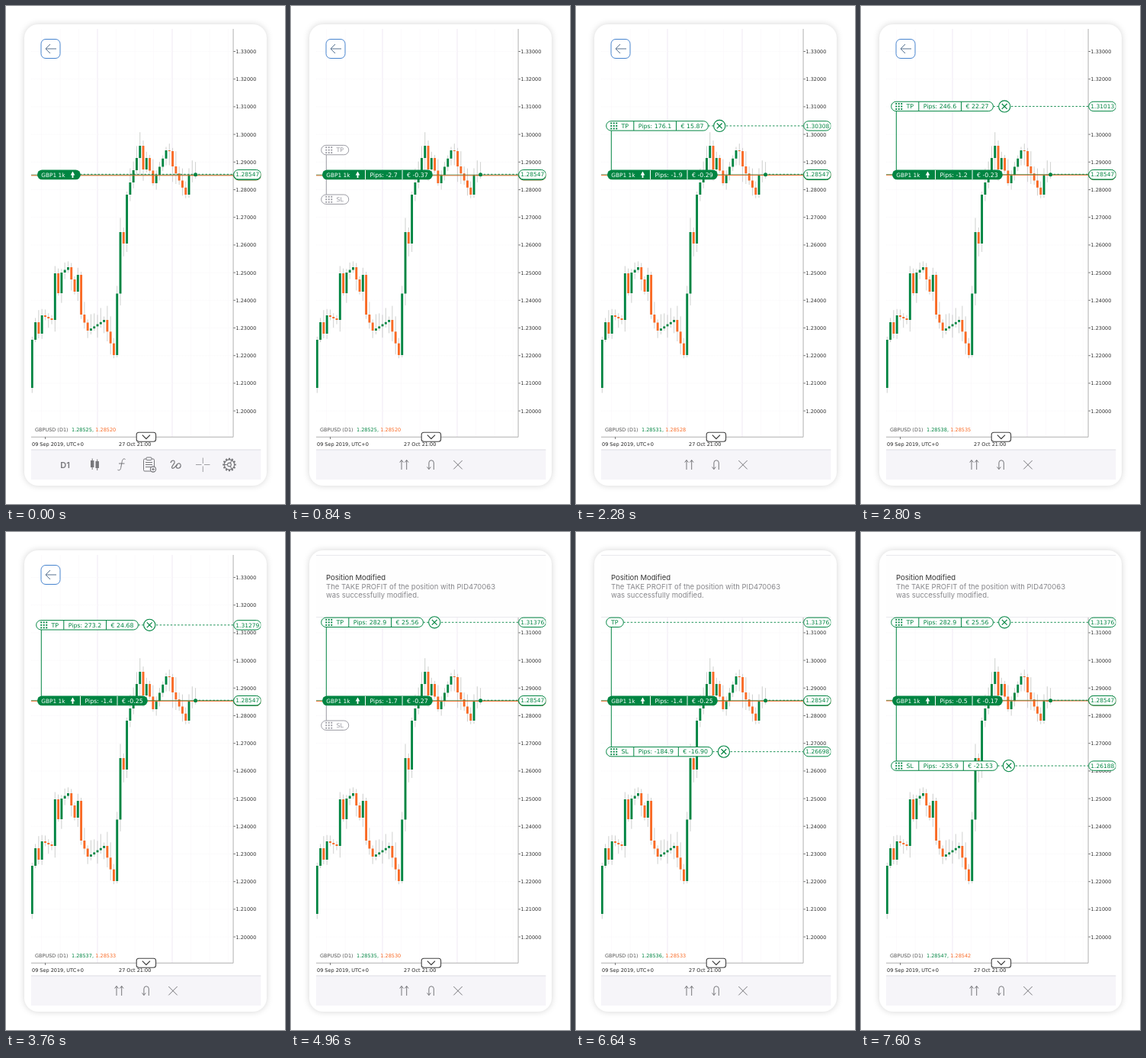
These frames come from a looping animation (366x652 px, 7.64 s). An HTML page with a canvas:

```html
<!DOCTYPE html>
<html lang="en">
<head>
<meta charset="utf-8">
<title>Chart order drag</title>
<style>
html, body { margin: 0; width: 100%; height: 100%; overflow: hidden; background: #fff; }
canvas { display: block; width: 366px; height: 652px; }
</style>
</head>
<body>
<canvas id="stage"></canvas>
<script>
const LOOP = 7640, STEP = 40, ENTRY = 1.28547, RATE = .09081;
const GREEN = '#008542', ORANGE = '#f96a25', GREY = '#9b9ba3', ICON = '#77777b', BAR = '#f6f5f9';
const CHART = '"DejaVu Sans", Verdana, sans-serif', UI = 'Inter, sans-serif';
const DASH = [2.5, 2.2], CELL = 7.85;
const canvas = document.getElementById('stage'), c = canvas.getContext('2d');
const dpr = window.devicePixelRatio || 1;
canvas.width = 366 * dpr;
canvas.height = 652 * dpr;

// Turning points of the market: [candle, stage height]
const swings = [[0, 500], [1, 437], [2, 414], [3, 429], [4, 405], [7, 411], [8, 350], [9, 376],
  [10, 349], [12, 342], [14, 374], [15, 352], [16, 404], [18, 425], [23, 411], [26, 457],
  [28, 296], [29, 311], [30, 247], [34, 183], [35, 214], [36, 199], [38, 232],
  [42, 189], [43, 190], [44, 210], [48, 247], [49, 221], [51, 222]];
const tpPath = [[1680, 1.29435], [2800, 1.31013], [3760, 1.31279], [4040, 1.31376]];
const slPath = [[5480, 1.2765], [6640, 1.26698], [7240, 1.26188]];
const asks = [25, 31, 38, 37, 35, 36, 47], spreads = [5, 3, 3, 4, 5, 3, 5];

const linear = k => k, smooth = k => k * k * (3 - 2 * k);
const priceY = p => 59.5 + (1.33 - p) * 3620;
const MID = priceY(ENTRY);

function along(path, t, ease = linear) {
  if (t <= path[0][0]) return path[0][1];
  const i = path.findIndex(p => t < p[0]);
  if (i < 0) return path[path.length - 1][1];
  const [t0, a] = path[i - 1], [t1, b] = path[i];
  return a + (b - a) * ease((t - t0) / (t1 - t0));
}

function seeded(seed) {
  return () => (seed = (seed * 16807) % 2147483647) / 2147483647;
}

function text(s, x, y, size, color, font = CHART, align = 'left', weight = 400) {
  c.font = `${weight} ${size}px ${font}`;
  c.fillStyle = color;
  c.textAlign = align;
  c.fillText(s, x, y);
}

function textWidth(s) {
  c.font = `${CELL}px ${CHART}`;
  return c.measureText(s).width;
}

function line(points, color, width = 1, dash = []) {
  c.beginPath();
  points.forEach(([x, y]) => c.lineTo(x, y));
  c.strokeStyle = color;
  c.lineWidth = width;
  c.setLineDash(dash);
  c.stroke();
  c.setLineDash([]);
}

const across = (x0, x1, y, ...style) => line([[x0, y], [x1, y]], ...style);
const down = (x, y0, y1, ...style) => line([[x, y0], [x, y1]], ...style);

function rect(x, y, w, h, color) {
  c.fillStyle = color;
  c.fillRect(x, y, w, h);
}

function box(x, y, w, h, r, fill, stroke, width = 1) {
  c.beginPath();
  c.roundRect(x, y, w, h, r);
  if (fill) { c.fillStyle = fill; c.fill(); }
  if (stroke) { c.strokeStyle = stroke; c.lineWidth = width; c.stroke(); }
}

const disc = (x, y, r, fill, stroke) => box(x - r, y - r, 2 * r, 2 * r, r, fill, stroke, 1.1);

function path(d, color = ICON, width = 1) {
  c.strokeStyle = color;
  c.lineWidth = width;
  c.stroke(new Path2D(d));
}

function card() {
  c.save();
  c.shadowColor = 'rgba(0,0,0,.17)';
  c.shadowBlur = 9 * dpr;
  box(24, 24, 318, 604, 18, '#fff');
  c.restore();
}

function candles() {
  const random = seeded(11);
  for (let i = 0; i < 51; i++) {
    const x = 34.3 + i * 4.286, open = along(swings, i), close = along(swings, i + 1);
    const top = Math.min(open, close), h = Math.max(1, Math.abs(open - close));
    down(x, top - 4 - 16 * random() ** 2, top + h + 3 + 18 * random() ** 2, '#c2c4c2', .8);
    rect(x - 1.45, top, 2.9, h, close <= open ? GREEN : ORANGE);
  }
}

function chart() {
  for (let i = 0; i < 11; i++) down(46.5 + i * 24.5, 30, 564, i % 4 == 3 ? '#f0e9f4' : '#fcfafc');
  for (let i = 0; i < 14; i++) {
    const y = 59.5 + i * 36.2;
    across(33, 298, y, '#f8f7f9', 1, [1, 1]);
    across(298, 301, y, '#777');
    text((1.33 - i / 100).toFixed(5), 301.5, y + 2.4, 6.5, '#333');
  }
  candles();
  line([[298.1, 30], [298.1, 564.3], [33, 564.3]], '#aaa', .9);
  for (const x of [51.5, 196.5]) down(x, 564, 567, '#777');
  text('09 Sep 2019, UTC+0', 34, 576.3, 6.5, '#222');
  text('27 Oct 21:00', 148, 576.3, 6.5, '#222');
  box(171.2, 558.2, 25.4, 12, 3, '#fff', '#444', 1.1);
  path('M178.8 561.7l5.1 5 5.1-5', '#333', 1.1);
}

function backButton() {
  box(46, 43.5, 25, 25, 6, '#fff', '#4784cf');
  path('M66 56H52m6-6-6 6 6 6', '#56718f');
}

function quotes(ask, bid) {
  text('GBPUSD (D1)', 38, 556.5, 6.5, '#555');
  text(ask.toFixed(5) + ',', 86, 556.5, 6.5, GREEN);
  text(bid.toFixed(5), 117.3, 556.5, 6.5, ORANGE);
}

function tag(price, color = GREEN, label = price.toFixed(5)) {
  const y = priceY(price);
  box(298.7, y - 6.2, 35.8, 12.4, 6.2, '#fff', color);
  text(label, 316.8, y + 2.7, 7.5, color, CHART, 'center');
}

function notice(t) {
  const k = Math.min(1, Math.max(0, (t - 4280) / 320));
  if (!k) return;
  c.save();
  c.translate(0, -82 * (1 - k) ** 2);
  rect(33, 30, 302, 82, '#fefefe');
  for (const y of [30.5, 111.5]) across(33, 335, y, '#e9e9ed');
  text('Position Modified', 46, 63, 9.5, '#333', UI);
  text('The TAKE PROFIT of the position with PID470063', 46, 75, 9.5, '#87878b', UI);
  text('was successfully modified.', 46, 86.3, 9.5, '#87878b', UI);
  c.restore();
}

function grip(y, color) {
  for (let i = 0; i < 9; i++) rect(45.3 + i % 3 * 3.5, y - 4.4 + Math.floor(i / 3) * 3.5, 1.9, 1.9, color);
}

// "Pips | money" cells of a pill, starting at the separator x
function cells(x, price, cost) {
  const pips = (price - ENTRY) * 1e4;
  const a = 'Pips: ' + pips.toFixed(1), b = '€ ' + (pips * RATE - cost).toFixed(2);
  const mid = x + 12.3 + textWidth(a);
  return { a, b, x, mid, end: mid + 12 + textWidth(b) };
}

function drawCells({ a, b, x, mid }, y, color) {
  for (const [s, left] of [[a, x], [b, mid]]) {
    down(left, y - 6, y + 6, color);
    text(s, left + 6, y + 2.8, CELL, color);
  }
}

function ghost(name, y) {
  box(39.7, y - 6.2, 36, 12.4, 6.2, '#fff', GREY);
  grip(y, GREY);
  text(name, 59.5, y + 2.8, CELL, GREY);
}

function order(name, price, cost, full) {
  const y = priceY(price), k = cells(75.8, price, cost);
  const end = full ? k.end : 62.3;
  across(end, 298, y, GREEN, .9, DASH);
  tag(price);
  box(39.7, y - 6.2, end - 39.7, 12.4, 6.2, '#fff', GREEN);
  text(name, full ? 59.5 : 46, y + 2.8, CELL, GREEN);
  if (!full) return;
  grip(y, GREEN);
  drawCells(k, y, GREEN);
  const x = end + 14.8;
  disc(x, y, 7.6, '#fff', GREEN);
  path(`M${x - 3.4} ${y - 3.4}l6.8 6.8m0-6.8l-6.8 6.8`, GREEN, 1.2);
}

function position(bid, selected) {
  const y = MID + .2, k = cells(97.5, bid, .12);
  box(41, y - 6.4, (selected ? k.end : 97.8) - 41, 12.8, 6.4, GREEN);
  text('GBP1 1k', 46.2, y + 2.7, 7.4, '#fff');
  c.fill(new Path2D(`M87.5 ${y - 4.5}l2.8 5h-1.9v3.6h-1.8v-3.6h-1.9z`));
  if (selected) drawCells(k, y, '#fff');
}

function marketLines(ask, bid, selected) {
  across(33, 298, priceY(ask) - .3, GREEN, .8);
  across(33, 298, priceY(bid) + .2, ORANGE, .9);
  across(selected ? 248 : 97, 298, MID - .4, GREEN, .9, DASH);
  disc(248.6, 220.8, 2.5, GREEN);
  tag(bid, ORANGE, '');
  tag(ask, GREEN, '');
  tag(ENTRY);
}

function gear(x, y) {
  c.save();
  c.translate(x, y);
  for (let i = 0; i < 12; i++) {
    c.rotate(Math.PI / 6);
    down(0, -6.4, -8.8, ICON, 2.2);
    if (i % 4 == 0) down(0, -2.4, -6.5, ICON);
  }
  c.restore();
  for (const r of [6.6, 2.4]) disc(x, y, r, null, ICON);
}

function mainTools() {
  text('D1', 77.5, 604.5, 11, ICON, UI, 'center', 600);
  for (const [x, y] of [[113.2, 595], [119.7, 596]]) {
    down(x, y - 2.5, y + 12, ICON);
    rect(x - 2.2, y, 4.4, 9, ICON);
  }
  path('M156.5 593.5c-3-2-4 1-4.5 4l-1.3 7c-.5 3-2 4-4.2 2.8M148 599h7.5');
  box(180.5, 593, 14, 16, 1.5, null, ICON);
  box(184, 591, 7, 3.5, 1, BAR, ICON);
  for (const y of [597.5, 600.5, 603.5]) across(183, 192, y, ICON);
  disc(193, 606.5, 3.6, BAR, ICON);
  path('M191 606.5h4m-2-2v4');
  path('M216 598c1-4 6-4 5 0-1 3-5 5-3 7 3 2 5-5 8-6 4-1 4 5 1 6-4 1-5-3-2-4', ICON, 1.2);
  path('M249 600.5h7.5m3.5 0h7.5M258.3 591.5v7.5m0 3.5v7.5', '#a0a0a4');
  gear(293, 600.5);
}

function editTools() {
  for (const x of [145, 151.7]) path(`M${x} 607v-12.5m-2.4 3l2.4-3 2.4 3`);
  path('M187.3 607v-9a3.2 3.2 0 0 0-6.4 0v8.5m-2.4-3l2.4 3 2.4-3');
  path('M213.3 595l11.4 11.4m0-11.4l-11.4 11.4');
}

function draw(t) {
  c.setTransform(dpr, 0, 0, dpr, 0, 0);
  rect(0, 0, 366, 652, '#fff');
  card();

  const beat = Math.floor(t / 1150);
  const ask = 1.285 + asks[beat] / 1e5, bid = ask - spreads[beat] / 1e5;
  const selected = t >= 640;
  const tpLive = t >= 1640, tpDrag = tpLive && t < 4200;
  const slLive = t >= 5440, slDrag = slLive && t < 7360;
  const tp = along(tpPath, t, smooth), sl = along(slPath, t, smooth);

  c.save();
  c.beginPath();
  c.rect(33, 30, 301.3, 590);
  c.clip();
  chart();
  backButton();
  quotes(ask, bid);
  notice(t);
  marketLines(ask, bid, selected);
  if (selected) {
    down(46.3, priceY(tp), MID, tpLive ? GREEN : GREY);
    if (!tpDrag) down(46.3, MID, priceY(sl), slLive ? GREEN : GREY);
    if (tpLive) order('TP', tp, .127, !slDrag);
    else ghost('TP', priceY(tp));
    if (slLive) order('SL', sl, .108, true);
    else if (!tpDrag) ghost('SL', priceY(sl));
  }
  position(bid, selected);
  rect(33, 581, 302, 39, BAR);
  across(33, 335, 581, '#dedde3');
  (selected ? editTools : mainTools)();
  c.restore();
}

function frame(now) {
  draw(Math.floor(now % LOOP / STEP) * STEP);
  requestAnimationFrame(frame);
}
draw(0);
requestAnimationFrame(frame);
</script>
</body>
</html>
```
